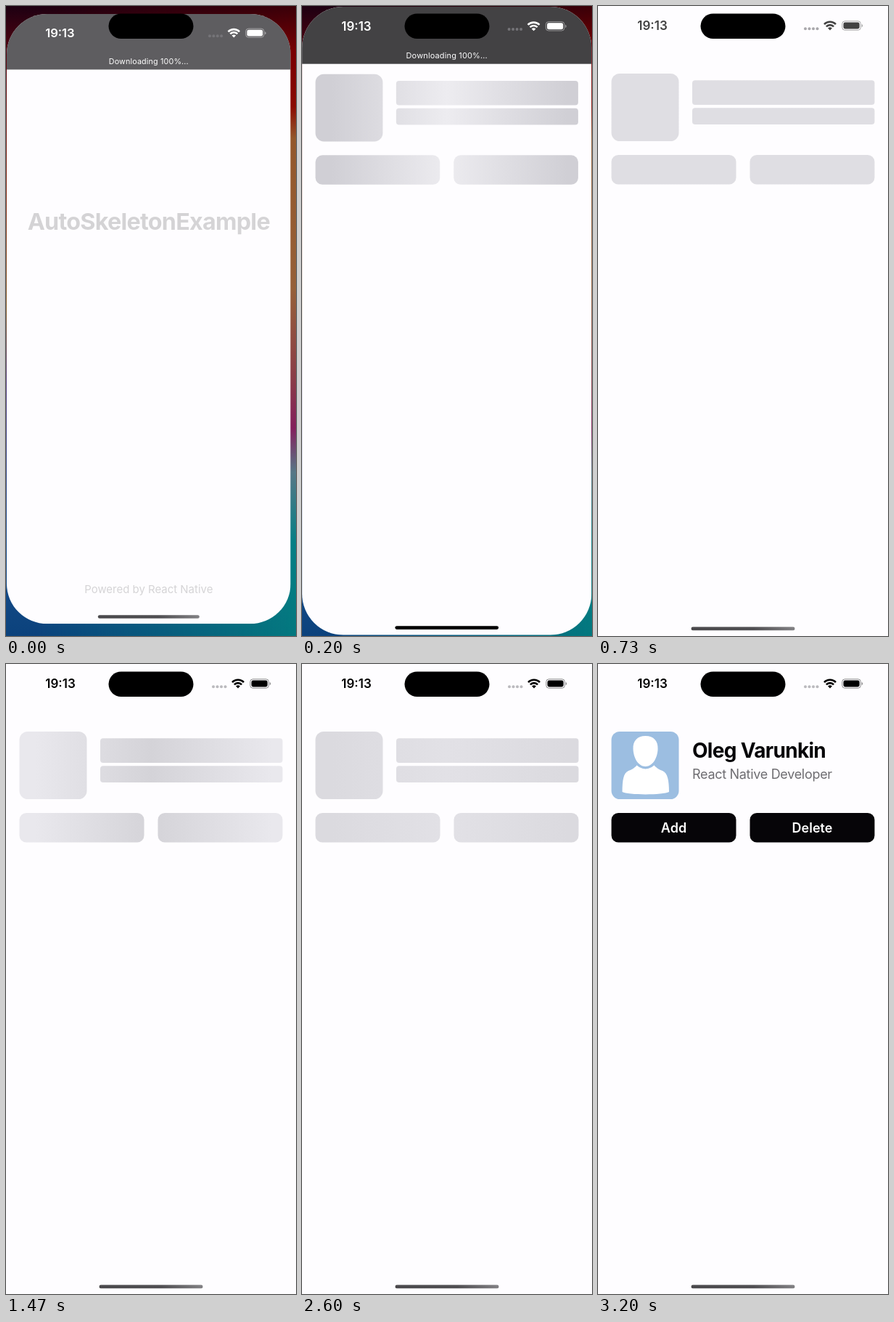
Recreate the animation shown at these times as an HTML page. Size 400 px wide and 867 px high, loop 3270 ms.

```html
<!DOCTYPE html>
<html lang="en">
<head>
<meta charset="utf-8">
<title>Skeleton loading</title>
<style>
  html, body { margin: 0; width: 100%; height: 100%; overflow: hidden; background: #fefdff; }
  svg { display: block; width: 100%; height: 100%; }
  text { font-family: Inter, "Liberation Sans", sans-serif; }
  .mid { text-anchor: middle; }
</style>
</head>
<body>
<svg viewBox="0 0 400 867" preserveAspectRatio="none">
  <defs>
    <linearGradient id="wallRight" x2="0" y2="1">
      <stop offset="0" stop-color="#3a0009"/>
      <stop offset=".07" stop-color="#780004"/>
      <stop offset=".16" stop-color="#8c0c04"/>
      <stop offset=".21" stop-color="#94592c"/>
      <stop offset=".45" stop-color="#96603a"/>
      <stop offset=".6" stop-color="#8a3a48"/>
      <stop offset=".67" stop-color="#84205c"/>
      <stop offset=".74" stop-color="#587887"/>
      <stop offset=".85" stop-color="#078086"/>
      <stop offset="1" stop-color="#04787f"/>
    </linearGradient>
    <linearGradient id="wallLeft" x2="0" y2="1">
      <stop offset="0" stop-color="#1d0012"/>
      <stop offset=".08" stop-color="#5a0410"/>
      <stop offset=".3" stop-color="#8a3018"/>
      <stop offset=".48" stop-color="#8c6430"/>
      <stop offset=".6" stop-color="#5a4488"/>
      <stop offset=".85" stop-color="#1b5090"/>
      <stop offset="1" stop-color="#0b427c"/>
    </linearGradient>
    <linearGradient id="fade">
      <stop offset=".1" stop-color="#fff"/>
      <stop offset="1" stop-color="#000"/>
    </linearGradient>
    <mask id="fadeMask"><rect width="400" height="867" fill="url(#fade)"/></mask>
    <linearGradient id="shimmer" gradientUnits="userSpaceOnUse" x1="19" x2="381" y1="0" y2="0">
      <stop class="edge" offset=".06"/>
      <stop class="core" offset=".5"/>
      <stop class="edge" offset=".96"/>
    </linearGradient>
    <linearGradient id="bar">
      <stop offset="0" stop-color="#4a494c"/>
      <stop offset=".6" stop-color="#504f52"/>
      <stop offset="1" stop-color="#828184"/>
    </linearGradient>
    <clipPath id="window"><rect id="frame" width="400" height="867"/></clipPath>
  </defs>

  <rect width="400" height="867" fill="url(#wallRight)"/>
  <rect width="400" height="867" fill="url(#wallLeft)" mask="url(#fadeMask)"/>

  <g id="app" clip-path="url(#window)">
    <rect width="400" height="867" fill="#fefdff"/>

    <g id="splash">
      <text class="mid" x="200" y="307" font-size="33" font-weight="700" letter-spacing="-.75">AutoSkeletonExample</text>
      <text class="mid" x="200" y="823" font-size="15.3">Powered by React Native</text>
    </g>

    <g id="skeleton" fill="url(#shimmer)">
      <rect x="18.5" y="93" width="93" height="93" rx="11.5"/>
      <rect x="130" y="102.3" width="251.5" height="33.7" rx="4"/>
      <rect x="130" y="140.3" width="251.5" height="22.7" rx="4"/>
      <rect x="18.5" y="205" width="172" height="40.5" rx="9.5"/>
      <rect x="209.5" y="205" width="172" height="40.5" rx="9.5"/>
    </g>

    <g id="card">
      <rect x="18.5" y="93" width="93" height="93" rx="11.5" fill="#9cbee1"/>
      <path fill="#fff" d="M33.5 176C33.5 160 35 150 42 147Q50 144 54 139H77Q81 144 89 147C96 150 98 160 98 176C90 180.5 41 180.5 33.5 176Z"/>
      <path fill="#fff" stroke="#9cbee1" stroke-width="7" paint-order="stroke" d="M65.5 99C77 99 83 106 82.5 117C82 130 75 141 65.5 141C56 141 49 130 48.5 117C48 106 54 99 65.5 99Z"/>
      <text x="130" y="129" font-size="28" font-weight="700" letter-spacing="-.7" fill="#060508">Oleg Varunkin</text>
      <text x="130" y="158" font-size="18" letter-spacing="-.3" fill="#6e6d71">React Native Developer</text>
      <g fill="#060508">
        <rect x="18.5" y="205" width="172" height="40.5" rx="9.5"/>
        <rect x="209.5" y="205" width="172" height="40.5" rx="9.5"/>
      </g>
      <g class="mid" fill="#fff" font-size="18" font-weight="600">
        <text x="104.5" y="231.7">Add</text>
        <text x="295.5" y="231.7">Delete</text>
      </g>
    </g>

    <g id="banner">
      <rect y="-1" width="400" height="80" fill="#403f42"/>
      <text class="mid" x="200" y="71.5" font-size="11" letter-spacing=".15" fill="#fff">Downloading 100%...</text>
    </g>

    <g id="status">
      <text class="mid" x="75" y="33.2" font-size="17" font-weight="600">19:13</text>
      <g id="dots">
        <circle cx="286" cy="31.3" r="2"/><circle cx="291.5" cy="31.3" r="2"/>
        <circle cx="297" cy="31.3" r="2"/><circle cx="302.5" cy="31.3" r="2"/>
      </g>
      <g fill="none" stroke="currentColor" stroke-width="2.6">
        <path d="M312 25.1A11.4 11.4 0 0 1 328 25.1"/>
        <path d="M314.9 28.3A7.1 7.1 0 0 1 325.1 28.3"/>
      </g>
      <path d="M317.1 30.6A4 4 0 0 1 322.9 30.6L320 33.5Z"/>
      <rect x="336.8" y="20.8" width="25.6" height="12.4" rx="3.8" fill="none" stroke="currentColor" stroke-opacity=".45"/>
      <path d="M363.8 25A2.3 2.3 0 0 1 363.8 29.2Z" opacity=".5"/>
      <rect x="338.5" y="22.5" width="22.2" height="9" rx="2.4"/>
    </g>

    <rect id="home" x="128.5" y="854.6" width="143" height="4.6" rx="2.3"/>
  </g>

  <rect x="141.5" y="10.5" width="117" height="34.5" rx="17.25"/>
</svg>

<script>
const LOOP = 3270;
const STEPS = [0, 70, 135, 200, 270, 330, 470, 530, 600, 670, 730, 800, 870,
  1000, 1200, 1470, 1600, 1800, 2070, 2600, 2800, 3070, 3130, 3200];

// Each track is a run of [time, value] points.
const TRACKS = {
  zoom: [[0, 0], [70, .55], [135, .8], [200, .92], [270, .98], [330, 1]],
  splash: [[0, .16], [70, .05], [135, 0]],
  shade: [[0, .84], [70, .92], [200, .985], [330, 1]],
  wave: [[0, .95], [200, 1], [330, .75], [530, .3], [730, 0], [870, -.1], [1000, -.2],
    [1200, -.85], [1470, -.75], [1600, -.5], [1800, -.35], [2070, .45], [2600, .25], [2800, .12], [3070, 0]],
  lift: [[330, 0], [470, 11], [530, 26.5], [600, 51], [670, 71], [730, 80]],
  ink: [[600, 0], [670, .45], [730, .74], [800, .92], [870, 1]],
  card: [[2800, 0], [3070, .4], [3130, .8], [3200, 1]]
};

const DARK = [208, 207, 213], LIGHT = [237, 236, 240];
const $ = id => document.getElementById(id);
const edges = document.querySelectorAll('.edge');
const core = document.querySelector('.core');

const lerp = (a, b, k) => a + (b - a) * k;
const mix = (a, b, k) => `rgb(${a.map((v, i) => Math.round(lerp(v, b[i], k)))})`;
const grey = v => [v, v, v];

function at(name, t) {
  const pts = TRACKS[name];
  const i = pts.findIndex(p => p[0] > t);
  if (i < 0) return pts[pts.length - 1][1];
  if (i === 0) return pts[0][1];
  const [t0, a] = pts[i - 1], [t1, b] = pts[i];
  return lerp(a, b, (t - t0) / (t1 - t0));
}

function set(el, attrs) {
  for (const key in attrs) el.setAttribute(key, attrs[key]);
}

function draw(now) {
  const time = now % LOOP;
  const t = STEPS.filter(s => s <= time).pop();
  const zoom = at('zoom', t), wave = at('wave', t), ink = at('ink', t), card = at('card', t);

  set($('app'), { transform: `translate(${1 - zoom} ${11 * (1 - zoom)}) scale(${lerp(.979, 1, zoom)} ${lerp(.968, 1, zoom)})` });
  set($('frame'), { rx: t < 330 ? 57 : 0 });
  set($('splash'), { opacity: at('splash', t) });
  set($('skeleton'), { opacity: t < 135 ? 0 : 1 - card });
  set($('card'), { opacity: card });
  set($('banner'), { transform: `translate(0 ${-at('lift', t)})`, opacity: at('shade', t) });

  const tint = mix(grey(255), grey(0), ink);
  set($('status'), { fill: tint, color: tint });
  set($('dots'), { fill: mix([117, 116, 120], [187, 186, 190], ink) });
  set($('home'), { fill: t >= 135 && t < 330 ? '#000' : 'url(#bar)' });

  const k = (1 + wave) / 2;
  edges.forEach(stop => set(stop, { 'stop-color': mix(LIGHT, DARK, k) }));
  set(core, { 'stop-color': mix(DARK, LIGHT, k) });
}

const start = performance.now();
function tick() {
  draw(performance.now() - start);
  requestAnimationFrame(tick);
}
tick();
</script>
</body>
</html>
```
